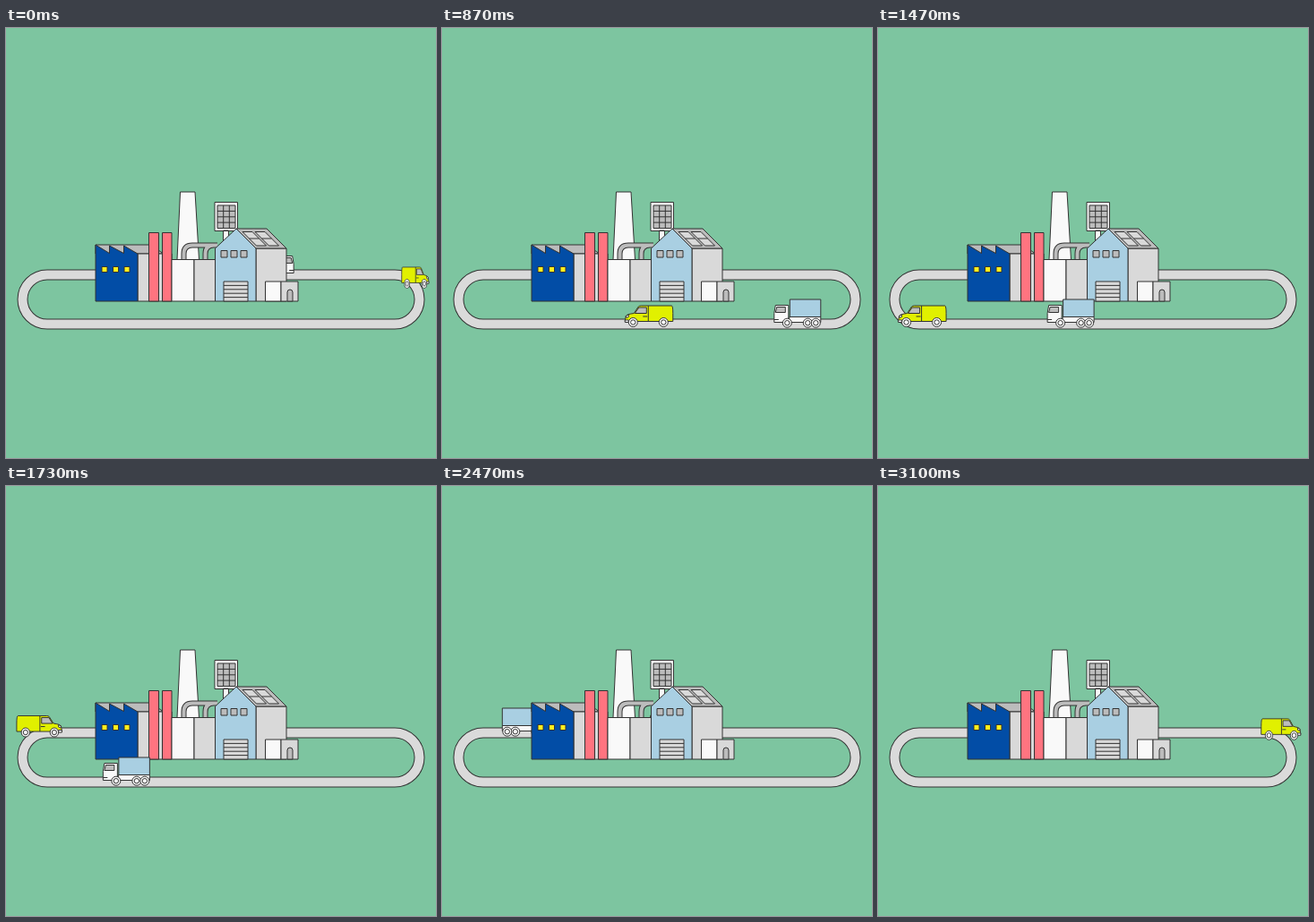
Write an HTML page that moves like this. It is 480x480 px and loops after 3130 ms.

```html
<!DOCTYPE html>
<html lang="en">
<head>
<meta charset="utf-8">
<title>Factory loop</title>
<style>
  html, body { margin: 0; height: 100%; overflow: hidden; background: #7dc5a0; }
  svg { display: block; width: 100%; height: 100%; stroke: #333; stroke-linejoin: round; }
  .line { fill: none; }
  .white { fill: #f9f9f9; }
  .light { fill: #d9d9d9; }
  .grey { fill: #bcbcbc; }
  .sky { fill: #a9cfe2; }
  .lime { fill: #e1f000; }
  .blue { fill: #024da6; }
  .pink { fill: #ff7480; }
</style>
</head>
<body>
<svg viewBox="0 0 480 480">
  <defs>
    <g id="wheel" class="white"><circle r="5"/><circle r="2.7"/></g>
    <rect id="road" x="18.5" y="275.5" width="443" height="55" rx="27.5"/>
    <path id="pipes" d="M198.5 258V252Q198.5 242.5 208 242.5H236M222.5 258V252Q222.5 242.5 232 242.5H236"/>
  </defs>

  <g class="line">
    <use href="#road" stroke-width="12"/>
    <use href="#road" stroke-width="10" stroke="#dadada"/>
  </g>

  <g id="factory">
    <!-- sawtooth hall -->
    <path class="grey" d="M100 242H161L176 252H147L100 252Z"/>
    <path class="light" d="M147 252H185V305H147Z"/>
    <path class="blue" d="M100 242L115.5 251.5V243L131.5 251.5V243L147 252V305H100Z"/>
    <path class="lime" d="M107 266.5h6v6h-6zM119.500 266.500h6v6h-6zM132 266.500h6v6h-6z" style="fill:#fff01e"/>
    <path class="pink" d="M159.500 228.500H170.500V305H159.500ZM174.500 228.500H185V305H174.500Z"/>

    <!-- chimney, tanks and pipes -->
    <path class="white" d="M194.500 183H211L215.500 258.500H191Z"/>
    <path class="white" d="M185 258.500H210V305H185Z"/>
    <path class="light" d="M210 258.500H233.500V305H210Z"/>
    <g class="line">
      <use href="#pipes" stroke-width="6"/>
      <use href="#pipes" stroke-width="4" stroke="#bcbcbc"/>
    </g>

    <!-- solar panel -->
    <path class="white" d="M242.500 226H248.500V240H242.500ZM233 194.500H258.500V226.500H233Z"/>
    <path class="grey" d="M236 198H256V223.500H236ZM242.700 198V223.500M249.300 198V223.500M236 204.400H256M236 210.800H256M236 217.100H256"/>

    <!-- warehouse -->
    <path class="light" d="M279 246H313V305H279Z"/>
    <path class="grey" d="M257 224H291L313 246H279Z"/>
    <path class="light" d="M264 227.500H275L290.500 243H279.500ZM278 227.500H289L304.500 243H293.500ZM271.500 235H282.500M285.500 235H296.500"/>
    <path class="sky" d="M233.500 246L257 224L279 246V305H233.500Z"/>
    <path class="grey" d="M240 248.500h7v7.500h-7zM251 248.500h7v7.500h-7zM262 248.500h7v7.500h-7z"/>
    <path class="light" d="M243 283H270V305H243ZM243 287.400H270M243 291.800H270M243 296.200H270M243 300.600H270"/>
    <path class="white" d="M289.500 283H307V305H289.500Z"/>
    <path class="light" d="M307 283H326V305H307Z"/>
    <path class="grey" d="M314 305V295Q314 292 317 292T320 295V305Z"/>
  </g>

  <!-- vehicles face left; their origin runs on the road's centre line -->
  <g id="van">
    <path class="lime" d="M-27 -3.500L-26 -9Q-25 -11 -17 -12L-12 -19.500Q-11 -20.500 -9 -20.500H25Q26.500 -20.500 26.500 -12V-3H-27Z"/>
    <path class="grey" d="M-16 -12L-11.500 -18.500H-3V-12Z"/>
    <path class="line" d="M-1 -20.500V-3M-7 -8.500H-2"/>
    <path class="white" d="M-26 -9L-23 -10.500V-8L-25.500 -7ZM-27 -4.500H-23V-2H-27Z"/>
    <use href="#wheel" x="-18" y="-2"/>
    <use href="#wheel" x="16" y="-2"/>
  </g>
  <g id="truck">
    <path class="white" d="M-9 -8H26V-2H-9Z"/>
    <path class="sky" d="M-8.500 -27.500H26V-8H-8.500Z"/>
    <path class="white" d="M-24.500 -21H-10V-2H-26V-12Z"/>
    <path class="grey" d="M-23 -19H-13.500V-13H-24.500Z"/>
    <path class="line" d="M-26 -5H-21"/>
    <use href="#wheel" x="-11.500" y="-1.300"/>
    <use href="#wheel" x="11.500" y="-1.300"/>
    <use href="#wheel" x="20.500" y="-1.300"/>
  </g>
</svg>
<script>
const LOOP = 3130, STEP = LOOP / 94;
const R = 27.5, ARC = Math.PI * R, STRAIGHT = 388, HALF = ARC + STRAIGHT;
const [factory, van, truck] = ['factory', 'van', 'truck'].map(id => document.getElementById(id));

// start: the time at which the vehicle enters the right-hand bend
function drive(vehicle, t, start) {
  const d = (t - start + LOOP) % LOOP / LOOP * 2 * HALF;
  const side = d < HALF ? 1 : -1;
  const along = d % HALF;
  const a = Math.min(along / R, Math.PI);
  const x = 240 + side * (STRAIGHT / 2 + R * Math.sin(a) - Math.max(0, along - ARC));
  const y = 303 - side * R * Math.cos(a);
  vehicle.setAttribute('transform', `translate(${x} ${y}) scale(${-side * Math.cos(a)} 1)`);
  if (y < 303) factory.before(vehicle);
  else factory.after(vehicle);
}

function frame() {
  const t = Math.floor((performance.now() % LOOP + 4) / STEP) * STEP;
  drive(van, t, 3042);
  drive(truck, t, 458);
  requestAnimationFrame(frame);
}
frame();
</script>
</body>
</html>
```
